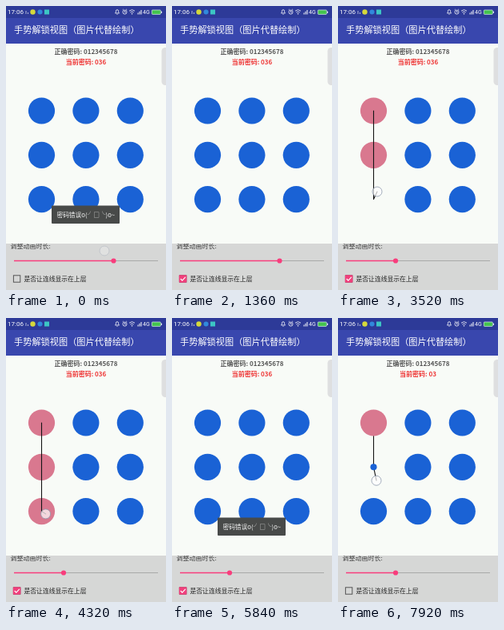
Animation, 200 px wide and 355 px high, one loop 8 s. Source, as an HTML page:

```html
<!DOCTYPE html>
<html lang="zh">
<head>
<meta charset="utf-8">
<title>Gesture lock</title>
<style>
  html, body { margin: 0; width: 100%; height: 100%; overflow: hidden; background: #f8fbf7; }
  svg { display: block; width: 100%; height: 100%; font-family: "Noto Sans CJK SC", "Noto Sans CJK", "Noto Sans", sans-serif; }
  .line { fill: none; stroke-width: 1.1; stroke-linejoin: round; stroke-linecap: round; }
  .hint { font-size: 8px; font-weight: 700; text-anchor: middle; }
</style>
</head>
<body>
<svg viewBox="0 0 200 355" preserveAspectRatio="none">
  <defs><clipPath id="panelClip"><rect y="297" width="200" height="58"/></clipPath></defs>
  <rect width="200" height="355" fill="#f8fbf7"/>
  <rect width="200" height="47" fill="#3947ae"/>
  <rect width="200" height="15" fill="#2d3a98"/>

  <g fill="#fff">
    <text x="2" y="10.4" font-size="8" font-family="Roboto, sans-serif">17:06</text>
    <path d="M25 6v4M27.5 8v2" stroke="#fff" stroke-width=".8" opacity=".8"/>
    <circle cx="33.5" cy="7.5" r="3.2" fill="#d5d83b"/>
    <circle cx="42.5" cy="7.5" r="3" fill="#3189dc"/>
    <rect x="48" y="4.5" width="6" height="6" fill="#3cc6c4"/>
    <g fill="none" stroke="#fff" stroke-width=".8">
      <path d="M136.5 9h5l-.9-1.3V6.3a1.6 1.6 0 0 0-3.2 0v1.4zM138.5 10.4h1"/>
      <circle cx="148.5" cy="7.6" r="2.5"/>
      <path d="M148.5 6v1.8h1.2M145.8 4.8l1-.8M151.2 4.8l-1-.8"/>
      <path d="M154 6.2q3.5-3 7 0M155.4 8q2.1-1.8 4.2 0"/>
    </g>
    <circle cx="157.5" cy="9.8" r=".8"/>
    <path d="M164.5 10.5h1v-2h-1zm2 0h1v-3.7h-1zm2 0h1V5h-1z"/>
    <text x="171" y="10.3" font-size="7" font-family="Roboto, sans-serif">4G</text>
    <rect x="182.3" y="5" width="11" height="5.4" rx=".8" fill="#43c34d" stroke="#dfe5f5" stroke-width=".7"/>
    <path d="M194 6.8h1v2h-1z"/>
    <text x="10" y="34" font-size="11.2">手势解锁视图（图片代替绘制）</text>
  </g>

  <text class="hint" x="100" y="60" fill="#555">正确密码: 012345678</text>
  <text class="hint" x="100" y="73" fill="#ee3434" id="entered"></text>
  <rect x="194.5" y="52" width="9" height="47" rx="4.5" fill="#dedfe0"/>

  <polyline class="line" id="lineBelow"/>
  <g id="nodes"></g>
  <polyline class="line" id="lineAbove"/>

  <rect y="297" width="200" height="58" fill="#d6d7d6"/>
  <g clip-path="url(#panelClip)"><text x="5.5" y="303" font-size="8" fill="#444" font-weight="500">调整动画时长:</text></g>
  <path d="M10 318.5H190" stroke="#a9aaa9"/>
  <path id="progress" stroke="#f83d7c" stroke-width="1.3"/>
  <circle id="thumb" cy="318.5" fill="#f83d7c"/>
  <circle id="ripple" cx="13.5" cy="341" fill="#000"/>
  <rect id="boxEdge" fill="none" stroke="#555"/>
  <g id="boxFill">
    <rect x="8.8" y="336.2" width="9.6" height="9.6" rx="1" fill="#f0407c"/>
    <path d="M10.7 341l2.1 2.2 4-4.3" fill="none" stroke="#fff" stroke-width="1.1"/>
  </g>
  <text x="22.5" y="344" font-size="7.8" fill="#222" font-weight="500">是否让连线显示在上层</text>

  <g id="toast">
    <rect x="57" y="249.5" width="85" height="22.5" rx="1" fill="#484a49"/>
    <text x="99.8" y="263.8" font-size="7.7" fill="#f4f4f4" text-anchor="middle">密码错误o(╯□╰)o~</text>
  </g>
  <circle id="finger" r="6" fill="#fff" fill-opacity=".7" stroke="#8d98ac" stroke-width=".8"/>
</svg>
<script>
const LOOP = 8000, HALF_FLIP = 180, RADIUS = 16.6;
const BLUE = '#1a62d5', PINK = '#d9788f', PURPLE = '#571b6b';
const $ = id => document.getElementById(id);
const set = (el, attrs) => { for (const k in attrs) el.setAttribute(k, attrs[k]); };
const clamp = v => Math.max(0, Math.min(1, v));
const ramp = (t, from, to) => clamp((t - from) / (to - from));
const smooth = v => v * v * (3 - 2 * v);
const between = (t, a, b) => t >= a && t < b;

const nodes = Array.from({ length: 9 }, (_, i) => {
  const el = document.createElementNS('http://www.w3.org/2000/svg', 'circle');
  const x = 44.5 + i % 3 * 55.4, y = 131 + Math.floor(i / 3) * 55.3;
  set(el, { cx: x, cy: y });
  $('nodes').append(el);
  return { el, x, y };
});

// Each gesture: node hit times, release time and reset time.
const gestures = [
  { hits: [[0, 2800], [3, 3080], [6, 3340]], release: 4850, reset: 5400 },
  { hits: [[0, 7530], [3, 7785]], release: LOOP, reset: LOOP }
];

// Finger keys: time, x, y, opacity.
const fingerKeys = [
  [0, 123, 306, .35], [240, 123, 306, 0],
  [820, 13, 341, 0], [880, 13, 341, .6], [960, 13, 341, .6], [1060, 13, 341, 0],
  [1540, 134, 318, 0], [1600, 134, 318, .6], [2140, 72, 318, .6], [2260, 72, 318, 0],
  [2740, 44, 128, 0], [2800, 44, 131, 1], [3080, 46, 169, 1], [3340, 48, 224, 1],
  [3520, 49, 232, 1], [4000, 50, 243, 1], [4850, 49, 248, 1], [4960, 49, 248, 0],
  [6720, 13, 341, 0], [6780, 13, 341, .6], [6920, 13, 341, .6], [7020, 13, 341, 0],
  [7470, 44, 128, 0], [7530, 44, 131, 1], [7785, 47, 169, 1], [7920, 48, 203, 1], [8000, 49, 221, 1]
];

function fingerAt(t) {
  const i = Math.max(1, fingerKeys.findIndex(k => k[0] > t));
  const a = fingerKeys[i - 1], b = fingerKeys[i], p = ramp(t, a[0], b[0]);
  return a.map((v, j) => v + (b[j] - v) * p);
}

function drawPattern(t, finger) {
  nodes.forEach(n => set(n.el, { r: RADIUS, fill: BLUE }));
  const gesture = gestures.find(g => between(t, g.hits[0][1], g.reset));
  const hits = gesture ? gesture.hits.filter(h => h[1] <= t) : [];
  const failed = gesture && t >= gesture.release;
  for (const [i, start] of hits) {
    const phase = (t - start) / HALF_FLIP;
    set(nodes[i].el, {
      r: failed ? RADIUS : RADIUS * Math.min(1, Math.abs(1 - phase)),
      fill: failed ? PURPLE : phase < 1 ? BLUE : PINK
    });
  }
  const points = hits.map(([i]) => `${nodes[i].x},${nodes[i].y}`);
  if (gesture && !failed) points.push(`${finger[1]},${finger[2]}`);
  const onTop = between(t, 960, 6960);
  const stroke = failed ? '#e5322d' : '#151515';
  set($('lineAbove'), { points: onTop ? points.join(' ') : '', stroke });
  set($('lineBelow'), { points: onTop ? '' : points.join(' '), stroke });
  $('entered').textContent = '当前密码: ' + (hits.length ? hits.map(h => h[0]).join('') : '036');
}

function drawControls(t) {
  const x = 134.5 - 62.5 * smooth(ramp(t, 1600, 2140));
  set($('progress'), { d: `M10 318.5H${x}` });
  set($('thumb'), { cx: x, r: 3.1 + 1.6 * ramp(t, 1560, 1640) * (1 - ramp(t, 2140, 2240)) });

  const checked = ramp(t, 960, 1060) * (1 - ramp(t, 6940, 7020));
  set($('boxFill'), { opacity: checked });
  const weight = 1 + 2.2 * (between(t, 6940, 7140) ? 1 - ramp(t, 7040, 7140) : 0);
  const size = 9.4 - weight;
  set($('boxEdge'), { x: 8.9 + weight / 2, y: 336.3 + weight / 2, width: size, height: size, 'stroke-width': weight });

  const tap = t < 4000 ? t - 860 : t - 6760;
  set($('ripple'), { r: 4 + 6 * ramp(tap, 0, 240), opacity: tap < 0 ? 0 : .12 * (1 - ramp(tap, 280, 460)) });
}

function draw(t) {
  const finger = fingerAt(t);
  drawPattern(t, finger);
  drawControls(t);
  const toast = t < 4000 ? 1 - ramp(t, 500, 760) : ramp(t, 4940, 5140) * (1 - ramp(t, 7080, 7360));
  set($('toast'), { opacity: toast });
  set($('finger'), { cx: finger[1], cy: finger[2], opacity: finger[3] });
}

const begin = performance.now();
function tick() {
  draw((performance.now() - begin) % LOOP);
  requestAnimationFrame(tick);
}
tick();
</script>
</body>
</html>
```
